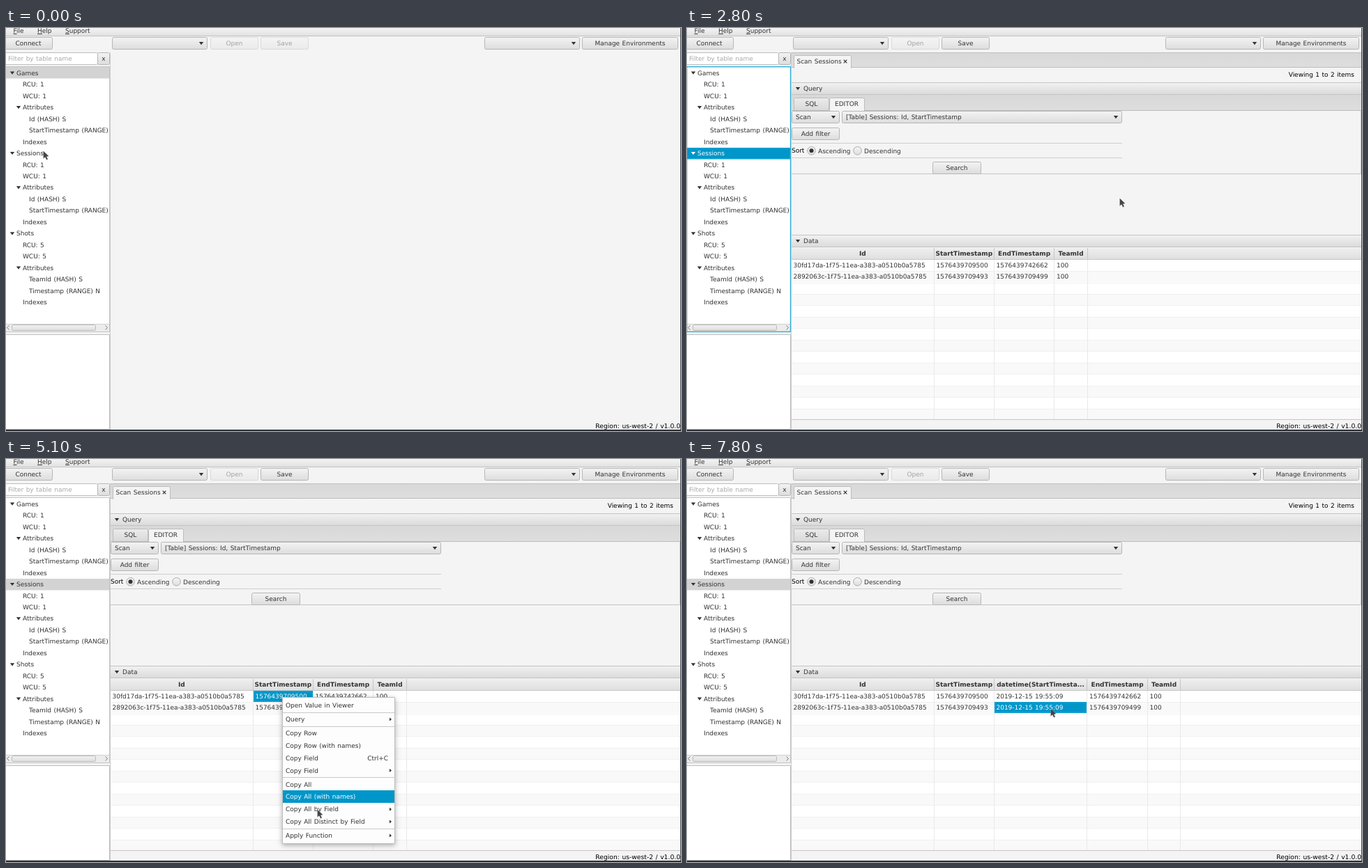
Recreate the animation shown at these times as an HTML page with a canvas. Size 968 px wide and 579 px high, loop 8 s.

```html
<!DOCTYPE html>
<html lang="en">
<head>
<meta charset="utf-8">
<title>Table browser</title>
<style>
html, body { margin: 0; width: 100%; height: 100%; overflow: hidden; background: #f4f4f4; }
canvas { display: block; }
</style>
</head>
<body>
<canvas id="stage" width="968" height="579"></canvas>
<script>
const ctx = document.getElementById('stage').getContext('2d');
const W = 968, H = 579, LOOP = 8000, TICK = 100;
const FONT = 'Verdana, "DejaVu Sans", sans-serif';
const ACCENT = '#0096c9', INK = '#333', LINE = '#c4c4c4';
const ROW = 16.47;

// ---- primitives ----
function rect(x, y, w, h, fill) {
  ctx.fillStyle = fill;
  ctx.fillRect(x, y, w, h);
}
function shade(y, h, top, bottom) {
  const g = ctx.createLinearGradient(0, y, 0, y + h);
  g.addColorStop(0, top);
  g.addColorStop(1, bottom);
  return g;
}
function box(x, y, w, h, fill, edge, r = 0) {
  ctx.beginPath();
  ctx.roundRect(x + .5, y + .5, w - 1, h - 1, r);
  ctx.fillStyle = fill;
  ctx.fill();
  ctx.strokeStyle = edge;
  ctx.lineWidth = 1;
  ctx.stroke();
}
function poly(points, fill) {
  ctx.beginPath();
  points.forEach(([x, y]) => ctx.lineTo(x, y));
  ctx.closePath();
  ctx.fillStyle = fill;
  ctx.fill();
}
function text(s, x, y, { color = INK, align = 'left', size = 8.97, bold = false } = {}) {
  ctx.font = `${bold ? 'bold ' : ''}${size}px ${FONT}`;
  ctx.fillStyle = color;
  ctx.textAlign = align;
  ctx.fillText(s, x, Math.round(y + 3.2));
}
function down(x, y, color = INK, w = 3.2) {
  poly([[x - w, y - 2], [x + w, y - 2], [x, y + 2.2]], color);
}
function chevron(x, y, dir) {
  ctx.beginPath();
  ctx.moveTo(x - dir * 1.5, y - 3);
  ctx.lineTo(x + dir * 1.5, y);
  ctx.lineTo(x - dir * 1.5, y + 3);
  ctx.strokeStyle = '#777';
  ctx.lineWidth = 1;
  ctx.stroke();
}

// ---- widgets ----
function button(label, x, y, w, enabled = true, h = 18) {
  ctx.globalAlpha = enabled ? 1 : .4;
  box(x, y, w, h, shade(y, h, '#f4f4f4', '#dcdcdc'), '#b6b6b6', 2);
  text(label, x + w / 2, y + h / 2, { align: 'center' });
  ctx.globalAlpha = 1;
}
function combo(label, x, y, w) {
  button('', x, y, w);
  text(label, x + 6, y + 9);
  down(x + w - 9, y + 9);
}
function paneHeader(label, y) {
  rect(149, y, 818, 18, shade(y, 18, '#f2f2f2', '#dadada'));
  rect(149, y, 818, 1, LINE);
  rect(149, y + 17, 818, 1, LINE);
  down(159, y + 9);
  text(label, 167, y + 9);
}
function radio(label, x, on) {
  ctx.beginPath();
  ctx.arc(x, 176.3, 5.8, 0, 7);
  ctx.fillStyle = shade(170, 12, '#f6f6f6', '#dedede');
  ctx.fill();
  ctx.strokeStyle = '#acacac';
  ctx.stroke();
  if (on) {
    ctx.beginPath();
    ctx.arc(x, 176.3, 3, 0, 7);
    ctx.fillStyle = INK;
    ctx.fill();
  }
  text(label, x + 9.5, 176.5);
}
function selection(x, y, w, h) {
  rect(x, y, w, h, ACCENT);
  ctx.strokeStyle = '#22a9d8';
  ctx.lineWidth = .7;
  ctx.strokeRect(x + 1.1, y + 1.1, w - 2.2, h - 2.2);
}

// ---- popup menus: '-' is a separator, '>' opens a submenu ----
function layout(y, items) {
  const rows = [];
  let cy = y + 12;
  for (const label of items) {
    if (label === '-') { cy += 2; rows.push({ label, y: cy - 10 }); continue; }
    rows.push({ label, y: cy });
    cy += 17.9;
  }
  return { rows, bottom: cy - 5.9 };
}
const rowAt = (rows, y) => rows.find(r => r.label !== '-' && Math.abs(y - r.y) < 9);

function popup(x, y, w, items, hot) {
  const { rows, bottom } = layout(y, items);
  ctx.save();
  ctx.shadowColor = 'rgba(0,0,0,.32)';
  ctx.shadowBlur = 7;
  ctx.shadowOffsetY = 2;
  rect(x, y, w, bottom - y, '#fdfdfd');
  ctx.restore();
  box(x, y, w, Math.round(bottom - y), '#fdfdfd', '#bdbdbd');
  for (const r of rows) {
    if (r.label === '-') { rect(x + 1, Math.round(r.y), w - 2, 1, '#c8c8c8'); continue; }
    const lit = hot && hot.label === r.label && hot.y === r.y;
    const color = lit ? '#fff' : INK;
    if (lit) rect(x + 1, Math.round(r.y - 9), w - 2, 18, ACCENT);
    const [label, hint] = r.label.replace('>', '').split('|');
    text(label, x + 5, r.y, { color });
    if (hint) text(hint, x + w - 10, r.y, { color, align: 'right' });
    if (r.label.endsWith('>')) {
      const ax = x + w - 8;
      poly([[ax, r.y - 2.5], [ax + 3, r.y], [ax, r.y + 2.5]], color);
    }
  }
}

const TABLE_MENU = ['Scan table', '-', 'Copy name', 'Create alike', '-', 'Delete table'];
const CELL_MENU = ['Open Value in Viewer', '-', 'Query>', '-', 'Copy Row', 'Copy Row (with names)',
  'Copy Field|Ctrl+C', 'Copy Field>', '-', 'Copy All', 'Copy All (with names)',
  'Copy All by Field>', 'Copy All Distinct by Field>', '-', 'Apply Function>'];
const SUBMENUS = {
  'Query>': [73, ['Add Query...', '-', 'GetShots', 'GetShots/?']],
  'Copy Field>': [83, ['Id', 'StartTimestamp', 'EndTimestamp', 'TeamId']],
  'Apply Function>': [62, ['datetime', 'base64']]
};

// ---- pointer: [from, to, x, y], sampled on the tick ----
const MOVES = [
  [0, 0, 53, 176], [1000, 1400, 75, 184], [1500, 1700, 620, 244], [3100, 3700, 397, 341],
  [4200, 4500, 422, 380], [4500, 5100, 446, 503], [5100, 5200, 450, 546],
  [5300, 5500, 451, 533], [5700, 5900, 453, 536], [6000, 6400, 580, 547],
  [6700, 7400, 521, 341], [7500, 7800, 521, 358]
];
function pointer(t) {
  t = Math.floor(t / TICK) * TICK;
  let x = 0, y = 0;
  for (const [a, b, px, py] of MOVES) {
    if (t < a) break;
    const k = b > a ? Math.min(1, (t - a) / (b - a)) : 1;
    x += (px - x) * k;
    y += (py - y) * k;
    if (k < 1) break;
  }
  return { x, y };
}
function drawPointer({ x, y }) {
  ctx.save();
  ctx.translate(Math.round(x) + .5, Math.round(y) + .5);
  const shape = [[0, 0], [0, 11.2], [2.6, 9], [4.6, 13], [6.6, 12], [4.8, 8.2], [8, 7.8]];
  poly(shape, '#444');
  ctx.strokeStyle = 'rgba(255,255,255,.35)';
  ctx.lineWidth = .6;
  ctx.stroke();
  ctx.restore();
}

// ---- window parts ----
function drawToolbar(open) {
  rect(0, 0, W, 11, shade(0, 11, '#f3f3f3', '#e2e2e2'));
  rect(0, 11, W, 1, '#c2c2c2');
  [['File', 10.5, 5], ['Help', 45, 7], ['Support', 85, 6]].forEach(([s, x, w]) => {
    text(s, x, 4);
    rect(x, 8, w, 1, INK);
  });
  button('Connect', -3, 13, 70);
  combo('', 152, 13, 137);
  button('Open', 293, 13, 69, false);
  button('Save', 365, 13, 69, open);
  combo('', 686, 13, 137);
  button('Manage Environments', 826, 13, 138);
}

const fields = (n, attrs) => [[1, `RCU: ${n}`], [1, `WCU: ${n}`], [1, 'Attributes', 1],
  ...attrs.map(a => [2, a]), [1, 'Indexes']];
const timed = ['Id (HASH) S', 'StartTimestamp (RANGE)'];
const TREE = [[0, 'Games', 1], ...fields(1, timed), [0, 'Sessions', 1], ...fields(1, timed),
  [0, 'Shots', 1], ...fields(5, ['TeamId (HASH) S', 'Timestamp (RANGE) N'])];

function drawSidebar(t) {
  const focused = t >= 500 && t < 3700, picked = t < 500 ? 0 : 7;
  const busy = t >= 1400 && t < 2800;
  box(-3, 35, 135, 18, '#fff', '#bebebe', 2);
  text('Filter by table name', 3, 43.5, { color: '#a9a9a9' });
  button('x', 131, 35, 18);

  box(-1, 55, 150, 382, '#fff', LINE);
  ctx.save();
  ctx.beginPath();
  ctx.rect(0, 55, 148, 382);
  ctx.clip();
  TREE.forEach(([depth, label, parent], i) => {
    const y = 64.6 + i * ROW, on = i === picked;
    const color = on && focused ? '#fff' : INK;
    if (on && focused) selection(-1, Math.round(y - 8.2), 150, 16.5);
    else if (on) rect(0, Math.round(y - 8.2), 148, 16.5, '#d3d3d3');
    if (parent) down(9 + depth * 9, y, color);
    text(label, 15 + depth * 9 + (on && busy ? 13.5 : 0), y, { color });
  });
  rect(0, 425, 148, 11, '#ececec');
  rect(0, 425, 148, 1, '#d2d2d2');
  box(8, 426, 121, 9, shade(426, 9, '#f2f2f2', '#dedede'), '#b9b9b9', 2);
  chevron(3, 430.5, -1);
  chevron(144, 430.5, 1);
  ctx.restore();
  if (focused) {
    ctx.strokeStyle = '#2fb0da';
    ctx.lineWidth = 1.4;
    ctx.strokeRect(-.3, 55.7, 148.8, 380.7);
  }
  box(-1, 440, 150, 137, '#fff', '#bcbcbc');
}

function tabStrip(y, h) {
  rect(149, y, 818, h, shade(y, h, '#d8d8d8', '#dedede'));
  rect(149, y + h - 1, 818, 1, '#bcbcbc');
}
function tab(label, x, y, w, on, offset) {
  ctx.beginPath();
  ctx.roundRect(x + .5, y + .5, w - 1, 18, [2, 2, 0, 0]);
  ctx.fillStyle = on ? '#f4f4f4' : shade(y, 18, '#ececec', '#d9d9d9');
  ctx.fill();
  ctx.strokeStyle = '#bcbcbc';
  ctx.lineWidth = 1;
  ctx.stroke();
  if (on) rect(x + 1, y + 17, w - 2, 2, '#f4f4f4');
  text(label, x + offset, y + 9);
}

function drawQuery() {
  tabStrip(35, 22);
  rect(149, 35, 818, 1, '#c0c0c0');
  tab('Scan Sessions', 153, 39, 83, true, 4.5);
  ctx.strokeStyle = INK;
  ctx.lineWidth = 1.2;
  ctx.beginPath();
  ctx.moveTo(224.7, 45.7); ctx.lineTo(229.3, 50.3);
  ctx.moveTo(229.3, 45.7); ctx.lineTo(224.7, 50.3);
  ctx.stroke();
  text('Viewing 1 to 2 items', 957, 67, { align: 'right', color: '#000' });

  paneHeader('Query', 78);
  box(149, 118, 818, 92, '#f4f4f4', LINE);
  tabStrip(96, 23);
  tab('SQL', 153, 100, 51, false, 16.5);
  tab('EDITOR', 204, 100, 51, true, 8);
  combo('Scan', 150, 119, 69);
  combo('[Table] Sessions: Id, StartTimestamp', 222, 119, 402);
  button('Add filter', 150, 143, 69);
  rect(150, 165, 474, 1, '#cfcfcf');
  text('Sort', 150, 175.5, { color: '#000' });
  radio('Ascending', 178.5, true);
  radio('Descending', 244.5, false);
  rect(150, 186, 474, 1, '#cfcfcf');
  button('Search', 352, 192, 70);
}

const COLUMNS = [
  ['Id', 205, '30fd17da-1f75-11ea-a383-a0510b0a5785', '2892063c-1f75-11ea-a383-a0510b0a5785'],
  ['StartTimestamp', 86, '1576439709500', '1576439709493'],
  ['datetime(StartTimesta...', 133.5, '2019-12-15 19:55:09', '2019-12-15 19:55:09'],
  ['EndTimestamp', 86.5, '1576439742662', '1576439709499'],
  ['TeamId', 47.5, '100', '100']
];
function pickedCell(t) {
  if (t < 3700) return null;
  if (t < 7400) return [1, 0];
  return [2, t < 7800 ? 0 : 1];
}
function drawData(t) {
  const top = 332.6, end = 562, cell = pickedCell(t);
  paneHeader('Data', 297);
  rect(149, 315, 818, 17, shade(315, 17, '#f0f0f0', '#dfdfdf'));
  rect(149, 332, 818, 1, '#c6c6c6');
  rect(149, 333, 818, end - 333, '#fff');
  for (let i = 0; top + i * ROW < end; i++) {
    const y = Math.round(top + i * ROW);
    if (i % 2) rect(149, y, 818, Math.min(Math.round(ROW), end - y), '#f9f9f9');
    if (i) rect(149, y, 818, 1, '#f0f0f0');
  }
  let x = 149.3;
  COLUMNS.forEach(([name, w, ...values], c) => {
    if (c === 2 && t < 6600) return;
    const edge = Math.floor(x + w), left = Math.floor(x) + 1;
    text(name, x + w / 2, 324, { bold: true, align: 'center' });
    rect(edge, 316, 1, 16, '#c6c6c6');
    rect(edge, 333, 1, end - 333, '#e9e9e9');
    values.forEach((v, r) => {
      const on = cell && cell[0] === c && cell[1] === r;
      if (on) selection(left, Math.round(top + r * ROW), edge - left, 16);
      text(v, x + 3.2, 340.7 + r * ROW, { color: on ? '#fff' : INK });
    });
    x += w;
  });
  rect(149, end, 818, 1, '#c6c6c6');
}

function drawMenus(t, at) {
  const late = pointer(t - TICK);
  if (t >= 900 && t < 1400) {
    popup(53, 176, 92, TABLE_MENU, t > 1100 && rowAt(layout(176, TABLE_MENU).rows, late.y));
  }
  if (t >= 4000 && t < 6600) {
    const { rows } = layout(342, CELL_MENU);
    const hot = t >= 5200 ? rows[rows.length - 1] : t >= 4300 && rowAt(rows, late.y);
    popup(396, 342, 162, CELL_MENU, hot);
    const sub = hot && SUBMENUS[hot.label];
    if (sub && t >= 4500 && (t < 5200 || t >= 5400)) {
      const y = Math.round(hot.y - 8.8);
      const inner = at.x > 557 && rowAt(layout(y, sub[1]).rows, at.y);
      popup(557, y, sub[0], sub[1], inner);
    }
  }
}

function draw(t) {
  const open = t >= 2800, at = pointer(t);
  rect(0, 0, W, H, '#f4f4f4');
  drawToolbar(open);
  drawSidebar(t);
  if (open) {
    drawQuery();
    drawData(t);
  }
  rect(149, 35, 1, 542, '#cdcdcd');
  text('Region: us-west-2 / v1.0.0', 967, 572, { align: 'right', color: '#000', size: 9.2 });
  rect(967, 0, 1, H, '#4a4d50');
  rect(0, 577, W, 2, '#2e3236');
  drawMenus(t, at);
  drawPointer(at);
}

ctx.textRendering = 'geometricPrecision';
ctx.wordSpacing = '0.6px';
const start = performance.now();
function tick() {
  draw((performance.now() - start) % LOOP);
  requestAnimationFrame(tick);
}
tick();
</script>
</body>
</html>
```
